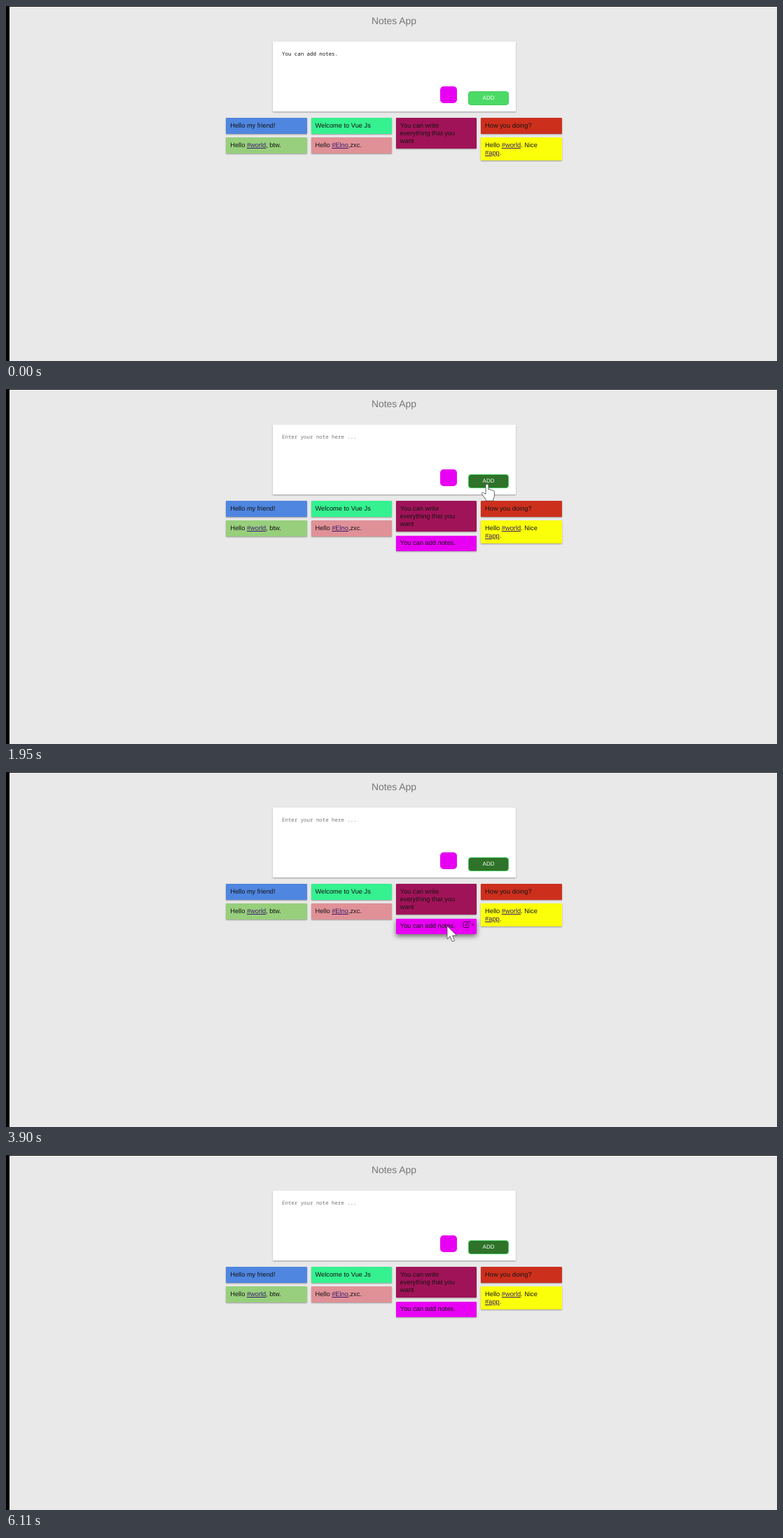
An HTML page that plays this animation: 1101 by 508 pixels, repeating every 6.37 s.

```html
<!DOCTYPE html>
<html lang="en">
<head>
<meta charset="utf-8">
<title>Notes App</title>
<style>
  html, body { margin: 0; width: 100%; height: 100%; overflow: hidden; background: #e9e9e9; }
  body { position: relative; font: 9.28px/10.7px "Liberation Sans", Arial, sans-serif; color: #151515; text-rendering: geometricPrecision; }
  div, svg { position: absolute; box-sizing: border-box; }
  .left { left: 0; top: 0; width: 5px; height: 100%; background: #000; }
  .top { left: 0; top: 0; width: 100%; height: 1.4px; background: #111; }
  .title { left: 454px; width: 200px; top: 13px; font-size: 13.92px; line-height: 17px; text-align: center; color: #777; }
  .card { left: 380.5px; top: 51px; width: 347px; height: 100px; background: #fff; border-radius: 1px; box-shadow: 0 1px 2px rgba(0,0,0,.35); }
  #field { left: 394px; top: 63.5px; font: 7.42px/10px "Noto Sans Mono", "Liberation Mono", monospace; white-space: pre; }
  .swatch { left: 620px; top: 115px; width: 24.3px; height: 24.3px; border-radius: 5px; background: #e800f3; }
  #add { left: 660px; top: 122px; width: 58px; height: 20px; border: 1px solid #46cb5f; border-radius: 4px; font-size: 8px; line-height: 18px; text-align: center; color: #f4fff4; }
  .note { width: 115.7px; padding: 5.8px 6px; border-radius: 1px; white-space: pre; }
  .note u { color: #3b1a6e; }
  .note svg { left: 95.5px; top: 2.5px; }
  #cursor { left: 0; top: 0; width: 100%; height: 100%; }
</style>
</head>
<body>
<div class="left"></div>
<div class="top"></div>
<div class="title">Notes App</div>
<div class="card"></div>
<div id="field"></div>
<div class="swatch"></div>
<div id="add">ADD</div>
<div id="notes"></div>
<svg id="cursor"><path fill="#fff" stroke="#555" stroke-width=".9" stroke-linejoin="round"/></svg>

<script>
const LOOP = 6370, STEP = 130, ADDED = 1690;
const ARROW = 'M0 0V18.6l4.2-4 3.1 7.6 3.3-1.4-3.1-7.3h6z';
const HAND = 'M-2 2a2 2 0 0 1 4 0V8c1-1 3-.7 3.4.8 1-.9 2.7-.5 3 .9.9-.5 2 .1 2 1.4v6c0 2-1.6 3.3-1.8 6.9h-10c-.5-3-3-5-5.5-9-1.6-2.6.2-3.9 2-2.4L-2 14.5z';
const ICONS = `<svg width="18" height="13" fill="none" stroke="#000" stroke-opacity=".65" stroke-width="1">
  <path d="M7 2.5H2.5q-1.5 0-1.5 1.5v5q0 1.5 1.5 1.5h5q1.5 0 1.5-1.5V7M4 8l.5-2 5-5 1.5 1.5-5 5z"/>
  <path d="M13 4.5l3 4m0-4l-3 4" stroke-width=".8"/></svg>`;

// x, y, lines, colour, text
const notes = [
  [314.2, 160.3, 1, '#4f86e0', 'Hello my friend!'],
  [314.2, 188.3, 1, '#97cf7c', 'Hello <u>#world</u>, btw.'],
  [435.5, 160.3, 1, '#35f190', 'Welcome to Vue Js'],
  [435.5, 188.3, 1, '#e09197', 'Hello <u>#Elno</u>,zxc.'],
  [556.8, 160.3, 3, '#a01358', 'You can write\neverything that you\nwant'],
  [556.8, 209.7, 1, '#e800f3', 'You can add notes.'],
  [678.1, 160.3, 1, '#cd2f1d', 'How you doing?'],
  [678.1, 188.3, 2, '#fbff0a', 'Hello <u>#world</u>. Nice\n<u>#app</u>.']
].map(([x, y, lines, color, text]) => {
  const el = document.createElement('div'), h = 11.6 + 10.7 * lines;
  el.className = 'note';
  el.style.cssText = `left:${x}px;top:${y}px;height:${h}px;background:${color}`;
  el.innerHTML = text + ICONS;
  document.getElementById('notes').append(el);
  return { el, icons: el.querySelector('svg'), box: [x, y, 115.7, h] };
});
const newNote = notes[5];

// time, x, y of the pointer
const path = [
  [130, 860, 520], [390, 690, 200], [520, 666, 169], [650, 667, 167],
  [1170, 687, 136], [2340, 687, 136], [2730, 677, 214], [3120, 655, 233.5],
  [3380, 626, 233.5], [3510, 624, 223], [3900, 630, 220.5], [4420, 630, 220.5],
  [4810, 654, 223], [5070, 657, 222], [5330, 657, 222], [5980, 640, 530]
];

function pointer(t) {
  const i = path.findIndex(p => p[0] > t);
  if (i < 1) return [-50, -50];
  const [t0, x0, y0] = path[i - 1], [t1, x1, y1] = path[i];
  const k = (t - t0) / (t1 - t0);
  return [x0 + (x1 - x0) * k, y0 + (y1 - y0) * k];
}

const inside = ([px, py], [x, y, w, h]) => px >= x && px <= x + w && py >= y && py <= y + h;

const field = document.getElementById('field');
const add = document.getElementById('add');
const cursor = document.querySelector('#cursor path');

function draw(t) {
  const pos = pointer(t), added = t >= ADDED;
  const onButton = inside(pos, [660, 122, 58, 20]);

  field.textContent = added ? 'Enter your note here ...' : 'You can add notes.';
  field.style.color = added ? '#757575' : '#111';
  add.style.background = t >= 1560 ? '#2f7229' : onButton ? '#5ed42d' : '#4cda66';

  newNote.el.style.display = added ? '' : 'none';
  for (const { el, icons, box } of notes) {
    // the shadow grows over the last few steps of hovering
    const lift = [0, 1, 2].filter(n => inside(pointer(t - n * STEP), box)).length / 3;
    icons.style.display = inside(pos, box) ? '' : 'none';
    el.style.boxShadow = `0 ${1 + 2 * lift}px ${2 + 5 * lift}px rgba(0,0,0,${.35 + .2 * lift})`;
  }

  cursor.setAttribute('d', onButton ? HAND : ARROW);
  cursor.setAttribute('transform', `translate(${pos})`);
}

const start = performance.now();
function tick() {
  const t = (performance.now() - start) % LOOP;
  draw(Math.floor(t / STEP) * STEP);
  requestAnimationFrame(tick);
}
tick();
</script>
</body>
</html>
```
